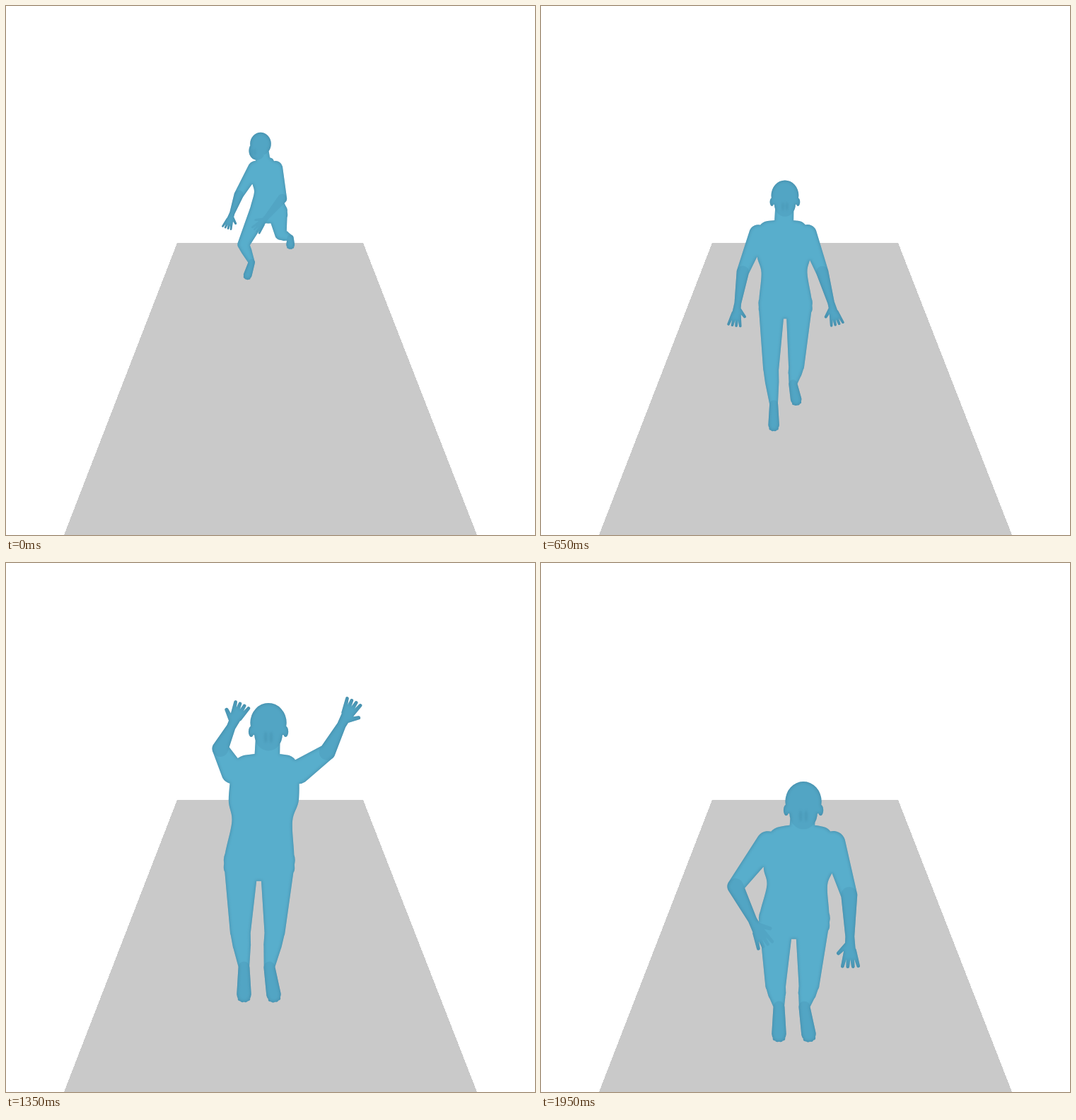
Animation of 748 by 748 pixels, one loop 2000 ms. Source, as an HTML page:

```html
<!DOCTYPE html>
<html lang="en">
<head>
<meta charset="utf-8">
<title>Running jump</title>
<style>
  html, body { margin: 0; width: 100%; height: 100%; overflow: hidden; background: #fff; }
  svg { display: block; width: 100vw; height: 100vh; }
</style>
</head>
<body>
<svg viewBox="0 0 748 748">
  <defs>
    <filter id="round" filterUnits="userSpaceOnUse" x="0" y="0" width="748" height="748" color-interpolation-filters="sRGB">
      <feMorphology in="SourceAlpha" operator="erode" radius="1"/>
      <feGaussianBlur stdDeviation="2.2" result="core"/>
      <feFlood flood-color="#58aecc"/>
      <feComposite in2="core" operator="in"/>
      <feComposite in2="SourceAlpha" operator="in" result="light"/>
      <feMerge><feMergeNode in="SourceGraphic"/><feMergeNode in="light"/></feMerge>
    </filter>
    <filter id="soft" filterUnits="userSpaceOnUse" x="0" y="0" width="748" height="748">
      <feGaussianBlur stdDeviation="1.6"/>
    </filter>
  </defs>
  <path d="M242 335H505L666 748H82Z" fill="#c9c9c9" shape-rendering="crispEdges"/>
  <path id="body" fill="#4b94b1" filter="url(#round)"/>
  <g fill="#2f7592">
    <path id="shadow" opacity=".15"/>
    <path id="face" opacity=".2" filter="url(#soft)"/>
  </g>
</svg>
<script>
const DURATION = 2000, STEP = 50;
const UPPER_ARM = 3, FOREARM = 2.3, HAND = 1.8;

// Key arm poses: time, then for the arm on screen left and right the upper arm
// and forearm angles in degrees (90 hangs down) and the foreshortening,
// which is negative for the upper arm and positive for the forearm.
const armPoses = [
  [0, 121, 110, .2, 78, 130, 0],
  [400, 123, 117, 0, 71, 77, -.1],
  [650, 112, 99, 0, 69, 74, 0],
  [850, 159, 133, -.3, -25, -42, 0],
  [950, 175, 100, -.35, -17, -16, 0],
  [1150, 108, 66, .35, 57, 15, .65],
  [1430, 258, 285, 0, -58, -70, 0],
  [1600, 92, -7, -.4, 61, 108, .85],
  [1950, 127, 63, .1, 73, 89, 0]
];

const clamp = u => Math.min(1, Math.max(0, u));
const ease = (t, from, to) => { const u = clamp((t - from) / (to - from)); return u * u * (3 - 2 * u); };
const fade = (t, from, to) => 1 - ease(t, from, to);
const bell = (t, centre, width) => Math.cos(clamp(Math.abs(t - centre) / width) * Math.PI / 2) ** 2;

const mix = (a, b, u) => [a[0] + (b[0] - a[0]) * u, a[1] + (b[1] - a[1]) * u];
const shift = (p, x, y) => [p[0] + x, p[1] + y];
const polar = (p, angle, r) => shift(p, Math.cos(angle) * r, Math.sin(angle) * r);
const angleOf = (a, b) => Math.atan2(b[1] - a[1], b[0] - a[0]);
const xy = p => p[0].toFixed(2) + " " + p[1].toFixed(2);

// All outlines run counter-clockwise so overlaps stay filled.
function limb(a, b, ra, rb) {
  const side = angleOf(a, b) + Math.PI / 2;
  return `M${xy(polar(a, side, ra))}L${xy(polar(b, side, rb))}A${rb} ${rb} 0 0 0 ${xy(polar(b, side, -rb))}` +
    `L${xy(polar(a, side, -ra))}A${ra} ${ra} 0 0 0 ${xy(polar(a, side, ra))}Z`;
}

function ellipse(x, y, rx, ry) {
  return `M${x - rx} ${y}a${rx} ${ry} 0 1 0 ${2 * rx} 0a${rx} ${ry} 0 1 0 ${-2 * rx} 0Z`;
}

function smooth(points) {
  const at = i => points[(i + points.length) % points.length];
  return "M" + xy(points[0]) + points.map((p, i) => {
    const next = at(i + 1), last = at(i - 1), far = at(i + 2);
    const c1 = shift(p, (next[0] - last[0]) / 6, (next[1] - last[1]) / 6);
    const c2 = shift(next, (p[0] - far[0]) / 6, (p[1] - far[1]) / 6);
    return `C${xy(c1)} ${xy(c2)} ${xy(next)}`;
  }).join("") + "Z";
}

function headShape([x, y], s, turn) {
  const ears = [-1, 1].map(side =>
    ellipse(x + side * s * (.95 - turn * .4), y + s * .48, s * .15, s * .3)).join("");
  return ellipse(x, y, s, s * 1.1) + ellipse(x - turn * s * .35, y + s * .66, s * .77, s * .88) + ears;
}

function torsoShape(head, shoulders, hips, s) {
  const middle = mix(...shoulders, .5);
  const neck = [(middle[0] + head[0]) / 2, middle[1] - s];
  const flank = i => {
    const out = i ? s : -s, shoulder = shoulders[i], hip = hips[i];
    return [
      shift(neck, out * .62, 0),
      shift(shoulder, -out * .12, -s * .58),
      shift(mix(shoulder, hip, .3), out * .38, 0),
      shift(mix(shoulder, hip, .56), out * .32, 0),
      shift(hip, out * .92, -s * .15),
      shift(hip, out * .75, s * .8)
    ];
  };
  const crotch = shift(mix(...hips, .5), 0, s * 1.15);
  return smooth([...flank(0), crotch, ...flank(1).reverse()]) +
    limb(head, shift(neck, 0, s * .3), s * .66, s * .7);
}

function legShape(hip, knee, ankle, s) {
  const calf = mix(knee, ankle, .38);
  return limb(hip, knee, s * .97, s * .57) + limb(knee, calf, s * .56, s * .5) + limb(calf, ankle, s * .5, s * .3);
}

function footShape(ankle, toe, s) {
  const heading = angleOf(ankle, toe), front = polar(toe, heading, -s * .4);
  const toes = [-.7, -.25, .25, .7].map(k =>
    ellipse(...polar(front, heading + k, s * .33), s * .13, s * .13)).join("");
  return limb(ankle, front, s * .31, s * .4) + toes;
}

function handShape(wrist, heading, length, s, thumbSide) {
  const palm = polar(wrist, heading, length * .42);
  const fingers = [-1.5, -.5, .5, 1.5].map(k => {
    const root = polar(palm, heading + Math.PI / 2, k * s * .14);
    return limb(root, polar(root, heading + k * .17, length * .5), s * .13, s * .09);
  }).join("");
  const thumb = polar(polar(wrist, heading, length * .5), heading + Math.PI / 2, thumbSide * s * .65);
  return limb(wrist, palm, s * .25, s * .3) + fingers + limb(polar(wrist, heading, length * .15), thumb, s * .16, s * .1);
}

// Arm joints as offsets in body units.
function armOffsets(pose, side) {
  const [upper, fore, short] = pose.slice(1 + 3 * side, 4 + 3 * side);
  const bone = (degrees, length) => polar([0, 0], degrees * Math.PI / 180, length);
  return [bone(upper, UPPER_ARM * (1 - Math.max(0, -short))), bone(fore, FOREARM * (1 - Math.max(0, short)))];
}

function arm(t, side, shoulder, s) {
  const k = Math.min(armPoses.length - 2, armPoses.findLastIndex(pose => pose[0] <= t));
  const a = armPoses[k], b = armPoses[k + 1], u = (t - a[0]) / (b[0] - a[0]);
  const from = armOffsets(a, side), to = armOffsets(b, side);
  const [upper, fore] = from.map((bone, i) => mix(bone, to[i], u));
  const elbow = shift(shoulder, upper[0] * s, upper[1] * s);
  const wrist = shift(elbow, fore[0] * s, fore[1] * s);
  const reach = HAND * s * (.6 + .4 * clamp(Math.hypot(...fore) / FOREARM));
  return {
    upper: limb(shoulder, elbow, s * .67, s * .45),
    fore: limb(elbow, wrist, s * .45, s * .25) + handShape(wrist, Math.atan2(fore[1], fore[0]), reach, s, side ? 1 : -1)
  };
}

function bodyAt(t) {
  const s = 14.8 + 10.8 * ease(t, 200, 1200);
  const turn = fade(t, 0, 350);
  const stoop = fade(t, 0, 500) + bell(t, 1100, 350) + ease(t, 1650, 1950);
  const jump = 80 * bell(t, 1430, 350);
  const head = [
    360 - 18 * Math.sin(Math.PI * Math.min(t, 1150) / 950),
    195 + .112 * Math.min(t, 850) + 63 * bell(t, 1150, 250) - jump + 47 * ease(t, 1650, 1950)
  ];
  const sway = .75 * Math.cos(Math.PI * t / 400) * fade(t, 200, 800) - .5 * ease(t, 600, 1200);
  const spread = (centre, half) => [-1, 1].map(side => shift(centre, side * half, 0));
  const chest = shift(head, s * (turn * .6 - .15), s * (2.8 - .5 * stoop));
  const pelvis = shift(head, s * sway, s * (7.85 - 1.4 * stoop));
  return {
    s, turn, stoop, head, pelvis,
    shoulders: spread(chest, s * 1.8 * (1 - .45 * turn)),
    hips: spread(pelvis, s * (1 - .15 * turn)),
    ground: 386 + 290 * clamp(t / 880) - jump * .8
  };
}

function leg(t, side, body) {
  const { s, turn, stoop, pelvis, ground } = body;
  const out = side ? 1 : -1;
  const lift = side ? 2.9 * bell(t, 0, 300) + 2 * bell(t, 700, 320) : 3.4 * bell(t, 400, 250);
  const drift = .5 * bell(t, 1000, 250) - .8 * bell(t, 400, 250);
  const toe = [pelvis[0] + s * (drift + out * (.85 + 1.25 * turn)), ground - lift * s];
  const ankle = shift(toe, s * (.5 * turn * (1 - side) - .3 * side * (1 - turn)), -s * (1.9 - .2 * lift - .3 * turn));
  const hip = body.hips[side];
  const knee = shift(mix(hip, ankle, .65 + .07 * lift + .1 * stoop * (1 - turn)), s * (out * .15 - .9 * turn), 0);
  return { shape: legShape(hip, knee, ankle, s), foot: footShape(ankle, toe, s) };
}

const set = (id, d) => document.getElementById(id).setAttribute("d", d);

function draw(t) {
  const body = bodyAt(t);
  const { s, turn, head, shoulders, hips } = body;
  const skull = headShape(head, s, turn);
  const arms = [0, 1].map(side => arm(t, side, shoulders[side], s));
  const legs = [0, 1].map(side => leg(t, side, body));
  const dark = skull + arms.map(a => a.fore).join("") + legs.map(l => l.foot).join("");
  set("body", torsoShape(head, shoulders, hips, s) + arms.map(a => a.upper).join("") + legs.map(l => l.shape).join("") + dark);
  set("shadow", dark);
  set("face", [-.15, .15].map(x => ellipse(head[0] + s * (x - turn * .7), head[1] + s * .8, s * .09, s * .32)).join(""));
}

const start = performance.now();
function tick() {
  const elapsed = (performance.now() - start) % DURATION;
  draw(Math.floor(elapsed / STEP) * STEP);
  requestAnimationFrame(tick);
}
tick();
</script>
</body>
</html>
```
